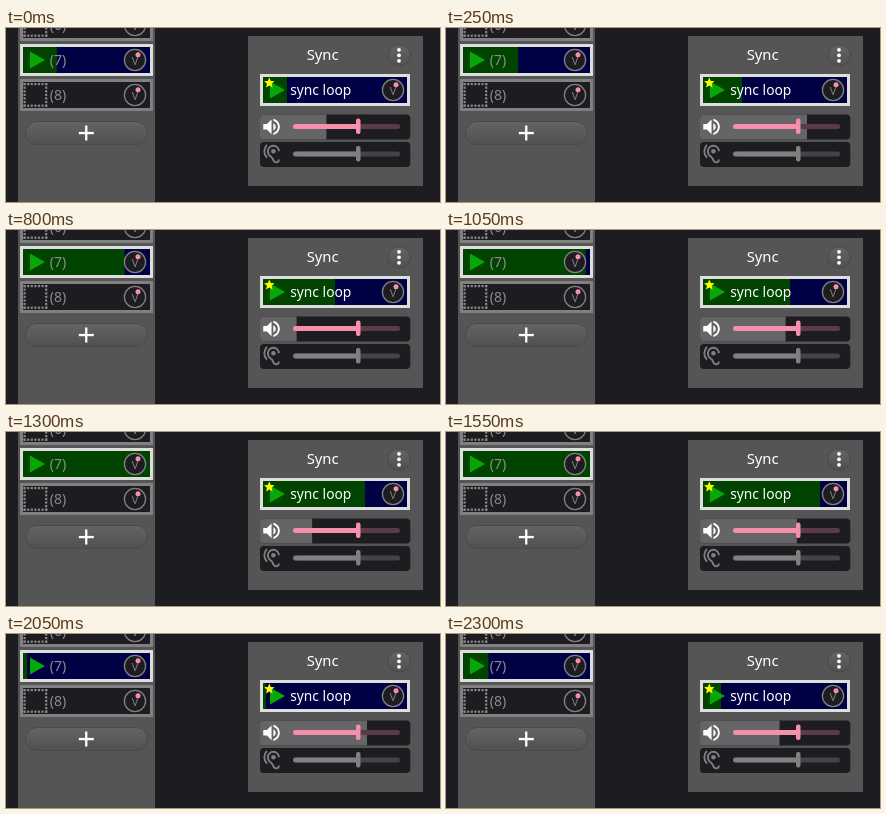
Recreate the animation shown at these times as an HTML page with a canvas. Size 434 by 174 pixels, loop 2.35 s.

```html
<!DOCTYPE html>
<html lang="en">
<head>
<meta charset="utf-8">
<title>Sync loop</title>
<style>
  html, body { margin: 0; width: 100%; height: 100%; overflow: hidden; background: #1d1c21; }
  canvas { display: block; width: 434px; height: 174px; }
</style>
</head>
<body>
<canvas id="stage" width="434" height="174"></canvas>
<script>
const ctx = document.getElementById('stage').getContext('2d');

const LOOP = 2350, STEP = 50;
const SYNC_LENGTH = 2400, TRACK_LENGTH = 1500, BEAT = 600;
const DARK = '#1d1c21', PANEL = '#555555', GREY = '#808080', PINK = '#f68fab';
const BLUE = '#000044', GREEN = '#004400', LIGHT = '#dedede';
const FONT = '"Noto Sans", "Open Sans", sans-serif';

const SPEAKER = new Path2D('M3 9v6h4l5 5V4L7 9H3zm13.5 3c0-1.77-1.02-3.29-2.5-4.03v8.05c1.48-.73 2.5-2.25 2.5-4.02zM14 3.23v2.06c2.89.86 5 3.54 5 6.71s-2.11 5.85-5 6.71v2.06c4.01-.91 7-4.49 7-8.77s-2.99-7.86-7-8.77z');
const EAR = new Path2D('M20 9a6 6 0 0 0-12 0c0 6 5 5 5.6 9 .6 2 1.6 3 3.4 3a3 3 0 0 0 3-3M7 2a10 10 0 0 0 0 14');

function rect(x, y, w, h, color) {
  ctx.fillStyle = color;
  ctx.fillRect(x, y, w, h);
}

function roundRect(x, y, w, h, r, color) {
  ctx.beginPath();
  ctx.roundRect(x, y, w, h, r);
  ctx.fillStyle = color;
  ctx.fill();
}

function disc(x, y, r, color) {
  ctx.beginPath();
  ctx.arc(x, y, r, 0, Math.PI * 2);
  ctx.fillStyle = color;
  ctx.fill();
}

function polygon(points, color) {
  ctx.beginPath();
  for (const [x, y] of points) ctx.lineTo(x, y);
  ctx.closePath();
  ctx.fillStyle = color;
  ctx.fill();
}

function text(label, x, y, size, color) {
  ctx.font = `${size}px ${FONT}`;
  ctx.fillStyle = color;
  ctx.fillText(label, x, y);
}

function pill(x, y, w, h) {
  const shade = ctx.createLinearGradient(0, y, 0, y + h);
  shade.addColorStop(0, '#646464');
  shade.addColorStop(1, '#505050');
  roundRect(x, y, w, h, h / 2, shade);
  ctx.strokeStyle = '#494949';
  ctx.lineWidth = 1;
  ctx.stroke();
}

function dial(x, y) {
  disc(x, y, 10.6, DARK);
  ctx.strokeStyle = GREY;
  ctx.lineWidth = 1.3;
  ctx.stroke();
  text('V', x - 3.3, y + 5, 11, GREY);
  disc(x + 3, y - 5.2, 2.5, PINK);
}

function playIcon(x, y) {
  polygon([[x, y - 8.5], [x + 15, y], [x, y + 8.5]], '#06a806');
}

function emptyIcon(x, y) {
  const pitch = 3.6, count = 7, size = 2.2;
  for (let i = 0; i < count; i++) {
    const d = i * pitch, end = (count - 1) * pitch;
    for (const [dx, dy] of [[d, 0], [d, end], [0, d], [end, d]]) {
      rect(x + dx, y + dy, size, size, '#888888');
    }
  }
}

function star(x, y, r) {
  const points = [];
  for (let i = 0; i < 10; i++) {
    const angle = i * Math.PI / 5 - Math.PI / 2;
    const radius = i % 2 ? r * 0.45 : r;
    points.push([x + radius * Math.cos(angle), y + radius * Math.sin(angle)]);
  }
  polygon(points, '#ffff00');
}

function row(x, y, w, border, fill, progress = 0) {
  const edge = 3;
  rect(x, y, w, 32, fill);
  rect(x + edge, y, (w - 2 * edge) * progress, 32, GREEN);
  ctx.strokeStyle = border;
  ctx.lineWidth = edge;
  ctx.strokeRect(x + edge / 2, y + edge / 2, w - edge, 32 - edge);
}

function emptyRow(label, y) {
  row(14, y, 133, GREY, DARK);
  emptyIcon(17.5, y + 4);
  text(label, 43.8, y + 21.4, 14, '#8c8c8c');
  dial(129, y + 16);
}

function slider(y, color, rest, level) {
  roundRect(254, y, 150.3, 25, 4, DARK);
  if (level) roundRect(254, y, level - 254, 25, [4, 0, 0, 4], '#656567');
  roundRect(288, y + 9.4, 106, 5, 2.5, rest);
  roundRect(287, y + 9.4, 65, 5, 2.5, color);
  roundRect(350, y + 4, 4.5, 15.5, 2, color);
}

function icon(path, x, y, paint) {
  ctx.save();
  ctx.translate(x, y);
  ctx.scale(0.92, 0.92);
  paint(path);
  ctx.restore();
}

// The meter jumps on each beat, then falls off slightly faster and faster.
function meterEdge(phase) {
  const age = (phase % BEAT || BEAT) - 50;
  return 361 - 0.095 * age - 0.00006 * age * age;
}

function drawTracks(phase) {
  rect(12, 0, 137, 174, PANEL);
  emptyRow('(6)', -19);
  row(14, 16, 133, LIGHT, BLUE, Math.min(1, phase / TRACK_LENGTH));
  playIcon(24, 32);
  text('(7)', 43.8, 37.4, 14, '#8c8c8c');
  dial(129, 32);
  emptyRow('(8)', 51);
  pill(19.5, 93.5, 122, 23);
  rect(72.8, 103.9, 15, 2.3, '#ffffff');
  rect(79.1, 97.5, 2.3, 15, '#ffffff');
}

function drawSync(phase) {
  rect(242, 8, 175, 150, PANEL);
  text('Sync', 300.7, 32.2, 14.8, '#ffffff');
  pill(382, 17, 22.5, 21);
  for (const y of [21.8, 27.3, 32.8]) disc(393, y, 1.9, '#ffffff');

  row(254, 46, 150, LIGHT, BLUE, phase / SYNC_LENGTH);
  playIcon(264, 62);
  star(263.3, 55, 5.5);
  text('sync loop', 284.2, 67.4, 13.8, '#ffffff');
  dial(387, 62);

  slider(86.5, PINK, '#5b3a49', meterEdge(phase));
  icon(SPEAKER, 254.5, 87.8, path => {
    ctx.fillStyle = '#ffffff';
    ctx.fill(path);
  });
  slider(114, GREY, '#444446');
  icon(EAR, 254.5, 115, path => {
    ctx.strokeStyle = GREY;
    ctx.lineWidth = 2;
    ctx.stroke(path);
    disc(14, 9, 2.5, GREY);
  });
}

function draw(now) {
  const time = Math.floor((now % LOOP) / STEP) * STEP;
  const phase = (time + 400) % SYNC_LENGTH;
  rect(0, 0, 434, 174, DARK);
  drawTracks(phase);
  drawSync(phase);
}

function tick() {
  draw(performance.now());
  requestAnimationFrame(tick);
}
tick();
</script>
</body>
</html>
```
